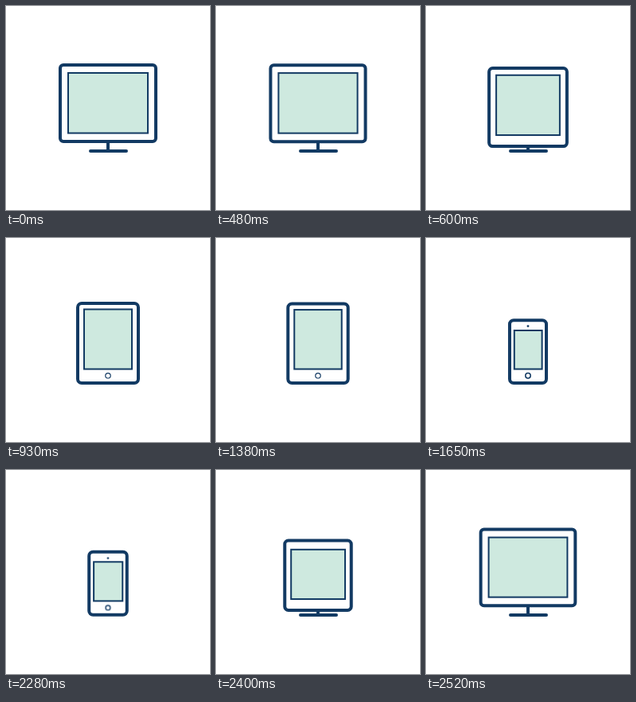
These frames come from a looping animation (256 px wide and 256 px high, 2550 ms). An HTML page without scripts:

```html
<!DOCTYPE html>
<html lang="en">
<head>
<meta charset="utf-8">
<title>Monitor, tablet, phone</title>
<style>
  html, body { margin: 0; width: 100%; height: 100%; overflow: hidden; background: #fff; }
  svg { display: block; width: 100%; height: 100%; stroke: #123a63; fill: #fff; }
  svg * { animation: 2550ms ease-in-out infinite; }

  .stand { stroke-width: 4; stroke-linecap: round; animation-name: stand; animation-timing-function: step-end; }
  .body { stroke-width: 4; animation-name: body; }
  .screen { stroke-width: 2; fill: #cee9df; animation-name: screen; }
  .button, .camera { transform-box: fill-box; transform-origin: center; }
  .button { animation-name: button; }
  .camera { fill: #123a63; stroke: none; animation-name: camera; }

  /* Monitor until 450 ms, tablet from 750, phone from 1650, back from 2250 */
  @keyframes body {
    0%, 17.647%, 100% { x: 68px; y: 74px; width: 120px; height: 96px; rx: 4px; }
    29.412%, 52.941% { x: 90px; y: 82px; width: 76px; height: 100px; rx: 5px; }
    64.706%, 88.235% { x: 105px; y: 103.3px; width: 46px; height: 78.7px; rx: 5px; }
  }
  @keyframes screen {
    0%, 17.647%, 100% { x: 78px; y: 84px; width: 100px; height: 75.5px; }
    29.412%, 52.941% { x: 98px; y: 89.5px; width: 60px; height: 75px; }
    64.706%, 88.235% { x: 110.8px; y: 116px; width: 34.8px; height: 48.5px; }
  }
  @keyframes button {
    0%, 23.529%, 94.118%, 100% { transform: scale(0); stroke-width: 1.2px; }
    29.412%, 52.941% { transform: none; stroke-width: 1.2px; }
    64.706%, 88.235% { transform: none; stroke-width: 1.5px; }
  }
  @keyframes camera {
    0%, 58.824%, 94.118%, 100% { transform: scale(0); }
    64.706%, 88.235% { transform: none; }
  }
  @keyframes stand {
    0%, 90%, 100% { visibility: visible; }
    40% { visibility: hidden; }
  }
</style>
</head>
<body>
<svg viewBox="0 0 256 256">
  <path class="stand" d="M128 170V182M106 182H151"/>
  <rect class="body"/>
  <rect class="screen"/>
  <circle class="button" cx="128" cy="172.8" r="3.2"/>
  <circle class="camera" cx="128" cy="110.6" r="1.4"/>
</svg>
</body>
</html>
```
